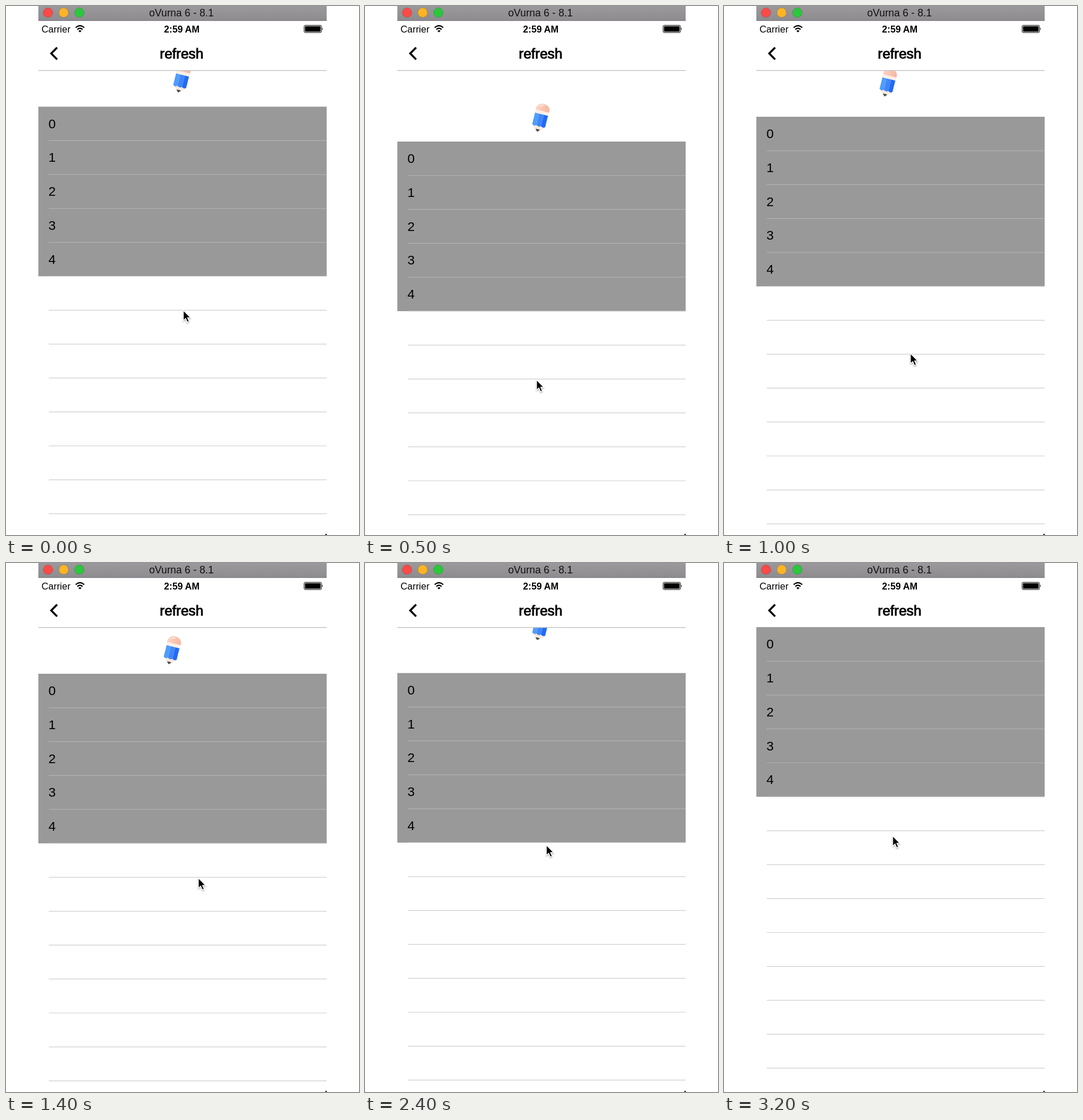
These frames come from a looping animation (611 px wide and 917 px high, 3.3 s). An HTML page:

```html
<!DOCTYPE html>
<html lang="en">
<head>
<meta charset="utf-8">
<title>Pull to refresh</title>
<style>
  html, body { margin: 0; width: 100%; height: 100%; overflow: hidden; background: #fff; }
  svg { display: block; font-family: "Liberation Sans", Arial, sans-serif; }
  .mid { text-anchor: middle; }
</style>
</head>
<body>
<svg width="611" height="917" viewBox="0 0 611 917">
  <defs>
    <linearGradient id="bar" x2="0" y2="1">
      <stop stop-color="#9b999c"/><stop offset="1" stop-color="#8e8c8f"/>
    </linearGradient>
    <linearGradient id="rubber">
      <stop stop-color="#fcd3c3"/><stop offset="1" stop-color="#f6b69f"/>
    </linearGradient>
    <clipPath id="view"><path d="M56 111H555V917H56z"/></clipPath>
    <filter id="soft" x="-50%" y="-50%" width="200%" height="200%">
      <feDropShadow dx="0" dy="1.5" stdDeviation="1.2" flood-opacity=".4"/>
    </filter>
  </defs>

  <g clip-path="url(#view)">
    <g id="pencil">
      <path d="M-11.5-11L0 0L11.5-11V-15H-11.5z" fill="#fbe9dc"/>
      <path d="M-4-4Q0-5.5 4-4L0 0z" fill="#4a4a4e"/>
      <path d="M-11.5-31.5H-4V-11Q-7.8-7.5-11.5-11z" fill="#4f9dfb"/>
      <path d="M-4-31.5H4V-11Q0-7.5-4-11z" fill="#3f87f6"/>
      <path d="M4-31.5H11.5V-11Q7.8-7.5 4-11z" fill="#2369fa"/>
      <path d="M-12-37H12V-31.5H-12z" fill="#fcefe6"/>
      <path d="M-12-37V-39C-12-46-6-49.5 0-49.5S12-46 12-39V-37z" fill="url(#rubber)"/>
      <path d="M-7-44Q-4-47 0-47" fill="none" stroke="#fde6dc" stroke-width="2" stroke-linecap="round"/>
    </g>
    <path d="M56 111.7H555" stroke="#c6c6c6" stroke-width="1.4"/>
    <g id="list"></g>
  </g>

  <path d="M56 0H555V25.5H56z" fill="url(#bar)"/>
  <path d="M56 25.2H555" stroke="#77757a"/>
  <g stroke-opacity=".15" stroke="#000">
    <circle cx="72.7" cy="11.5" r="8.3" fill="#fc4a47"/>
    <circle cx="99.8" cy="11.5" r="8.3" fill="#fdb425"/>
    <circle cx="126.9" cy="11.5" r="8.3" fill="#2bc73c"/>
  </g>
  <text class="mid" x="303.7" y="18" font-size="17.8" fill="#111">oVurna 6 - 8.1</text>

  <text x="61.5" y="45.5" font-size="16.4">Carrier</text>
  <g fill="none" stroke="#000" stroke-width="2.1">
    <path d="M120.6 37.6Q128 30.6 135.4 37.6M123.4 40.7Q128 36.4 132.6 40.7"/>
  </g>
  <path d="M125.3 43Q128 40.8 130.7 43L128 45.8z"/>
  <text class="mid" x="304.3" y="45.5" font-size="16.2" font-weight="700">2:59 AM</text>
  <rect x="516" y="33.5" width="30" height="12.5" rx="2" fill="#fff" stroke="#000"/>
  <rect x="517.5" y="35" width="27" height="9.5" rx="1"/>
  <path d="M547.3 37.5Q549.3 39.7 547.3 42z"/>

  <path d="M88.5 72L78.3 82.3L88.5 92.6" fill="none" stroke="#000" stroke-width="3.4"/>
  <text class="mid" x="304" y="91" font-size="24.2" stroke="#000" stroke-width=".9">refresh</text>
  <path d="M553 915H555V917H553z"/>

  <path id="cursor" filter="url(#soft)" stroke="#fff" stroke-width="1.2"
        d="M0 0V17.6L4 13.9L6.8 20.6L9.9 19.3L7.1 12.8H12.4z"/>
</svg>

<script>
const LOOP = 3300, STEP = 100, ROW = 58.8, HOME = 111.3, HELD = 192;
const el = id => document.getElementById(id);
const part = (t, start, span) => Math.min(1, Math.max(0, (t - start) / span));
const mix = (a, b, u) => a + (b - a) * u;
const smooth = u => u * u * (3 - 2 * u);
const pull = t => { const u = part(t, 0, 500); return u * (1.25 - .25 * u); };

// Rows sit on a grey block, empty separators follow below it.
let rows = `<path d="M56 0H555V${ROW * 5}H56z" fill="#999"/>`;
for (let i = 0; i < 14; i++) {
  const y = ROW * (i + 1);
  if (i < 5) rows += `<text x="73.6" y="${ROW * i + 37}" font-size="22.6">${i}</text>`;
  rows += `<path d="M74 ${y}H555" stroke="${i < 4 ? '#b1b1b1' : '#d0d0d0'}" stroke-width="1.2"/>`;
}
el('list').innerHTML = rows;

// Mouse path: time, x, y
const path = [
  [500, 297, 648], [700, 297, 648], [1200, 340, 572], [1300, 341, 558], [1400, 333, 546],
  [1800, 330, 532], [2400, 314, 489], [2600, 269, 441], [3200, 292, 473]
];

function mouse(t) {
  if (t <= 500) return [mix(307, 297, pull(t)), mix(527.5, 648, pull(t))];
  const i = path.findIndex(p => p[0] >= t), [t0, x0, y0] = path[i - 1], [t1, x1, y1] = path[i];
  const u = part(t, t0, t1 - t0);
  return [mix(x0, x1, u), mix(y0, y1, u)];
}

function listTop(t) {
  if (t < 2370) return mix(mix(174.5, 235, pull(t)), HELD, smooth(part(t, 522, 250)));
  return mix(HELD, HOME, smooth(part(t, 2370, 410)));
}

// The pencil follows the pull, draws one circle, then slips up under the header.
function pencilTip(t, top) {
  if (t <= 522) return [298, mix(150, 218, pull(t))];
  if (t < 1805) {
    const a = (-52 - .2786 * (t - 700)) * Math.PI / 180;
    return [286 + 11.5 * Math.cos(a), top - 27 + 11.5 * Math.sin(a)];
  }
  const u = part(t, 2150, 450);
  return [298, 165 - 101 * u * u];
}

function place(id, [x, y], turn = 0) {
  el(id).setAttribute('transform', `translate(${x} ${y}) rotate(${turn})`);
}

function draw(now) {
  const t = Math.floor(now % LOOP / STEP) * STEP, top = listTop(t);
  place('list', [0, top]);
  place('pencil', pencilTip(t, top), 14);
  place('cursor', mouse(t));
  requestAnimationFrame(draw);
}
draw(performance.now());
</script>
</body>
</html>
```
